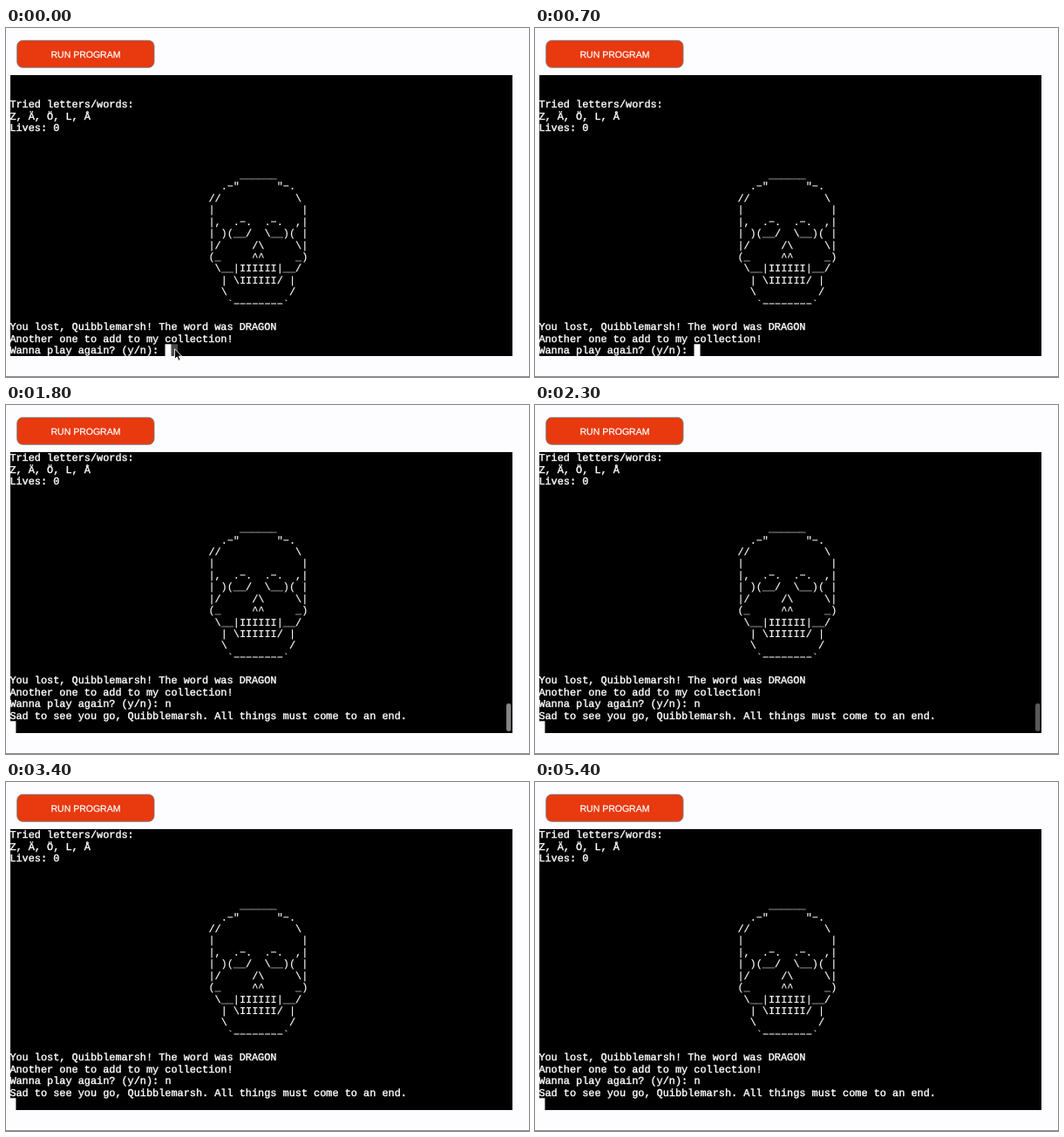
These frames come from a looping animation (600 by 400 pixels, 5500 ms). An HTML page:

```html
<!DOCTYPE html>
<html lang="en">
<head>
<meta charset="utf-8">
<title>Word game terminal</title>
<style>
  html, body { margin: 0; width: 100%; height: 100%; overflow: hidden; background: #fdfcfe; }
  svg { display: block; width: 600px; height: 400px; }
  text { fill: #fff; stroke: #fff; text-rendering: geometricPrecision; white-space: pre; }
  .label { font: 10.5px "Liberation Sans", Arial, sans-serif; text-anchor: middle; stroke-width: .25px; }
  #screen { font: 11.875px "Liberation Mono", "Courier New", monospace; stroke-width: .4px; }
  #screen .art { stroke-width: .15px; }
</style>
</head>
<body>
<svg viewBox="0 0 600 400">
  <rect y="399" width="600" height="1" fill="#8a8a8c"/>
  <rect x="12.7" y="14.3" width="157.3" height="31" rx="6.5" fill="#e8390f" stroke="#777c7c" stroke-width=".9"/>
  <text class="label" x="91.5" y="34">RUN PROGRAM</text>
  <rect x="5" y="54" width="576" height="322" fill="#000"/>
  <rect id="ghost" x="189.5" y="362.4" width="7.5" height="13.6" fill="#4c4c4c"/>
  <rect id="caret" y="362.3" width="7" height="13.7" fill="#fff"/>
  <g id="screen"></g>
  <rect id="thumb" x="574" y="342" width="5.4" height="32" rx="2.7" fill="#858585"/>
  <path id="pointer" d="M193.5 367.8v11.6l2.7-2.5 1.9 4.4 2-.9-1.9-4.2h3.6z"
        fill="#000" stroke="#fff" stroke-width=".9" stroke-linejoin="round"/>
</svg>
<script>
const LOOP = 5500, LEFT = 4.4, TOP = 53.7, COL = 7.125, ROW = 13.42;
const NAME = 'Quibblemarsh';
const $ = id => document.getElementById(id);
const screen = $('screen');

function print(row, col, str) {
  const el = document.createElementNS('http://www.w3.org/2000/svg', 'text');
  el.setAttribute('x', LEFT + col * COL);
  el.setAttribute('y', TOP + row * ROW + 10.6);
  el.textContent = str;
  screen.append(el);
  return el;
}

['Tried letters/words:', 'Z, Ä, Ö, L, Å', 'Lives: 0']
  .forEach((s, i) => print(2 + i, 0, s));

// The wide minus sign draws the long strokes of the skull.
[
  '     ______',
  '  .-"      "-.',
  '//            \\',
  '|              |',
  '|,  .-.  .-.  ,|',
  '| )(__/  \\__)( |',
  '|/     /\\     \\|',
  '(_     ^^     _)',
  ' \\__|IIIIII|__/',
  '  | \\IIIIII/ |',
  '  \\          /',
  '   `--------`'
].forEach((s, i) => {
  const art = s.trimStart();
  const el = print(8 + i, 32 + s.length - art.length, art.replaceAll('-', '\u2212'));
  el.setAttribute('class', 'art');
  el.setAttribute('dy', .4);
});

print(21, 0, `You lost, ${NAME}! The word was DRAGON`);
print(22, 0, 'Another one to add to my collection!');
print(23, 0, 'Wanna play again? (y/n):');
const answer = print(23, 25, 'n');
const farewell = print(24, 0, `Sad to see you go, ${NAME}. All things must come to an end.`);

const show = (el, on) => el.setAttribute('opacity', Number(on));

function draw(t) {
  const typed = t >= 800, ended = t >= 1800;
  show($('pointer'), t < 600);
  show($('ghost'), t < 700);
  show(answer, typed);
  show(farewell, ended);
  screen.setAttribute('transform', `translate(0 ${ended ? -2 * ROW : 0})`);
  $('caret').setAttribute('x', LEFT + COL * (ended ? 0 : typed ? 26 : 25));

  // The scrollbar fades out in three steps.
  const fade = t < 2300 ? 0 : Math.floor((t - 2200) / 100);
  show($('thumb'), ended ? Math.max(0, 1 - fade / 3) : 0);
}

const start = performance.now();
function tick() {
  draw((performance.now() - start) % LOOP);
  requestAnimationFrame(tick);
}
tick();
</script>
</body>
</html>
```
